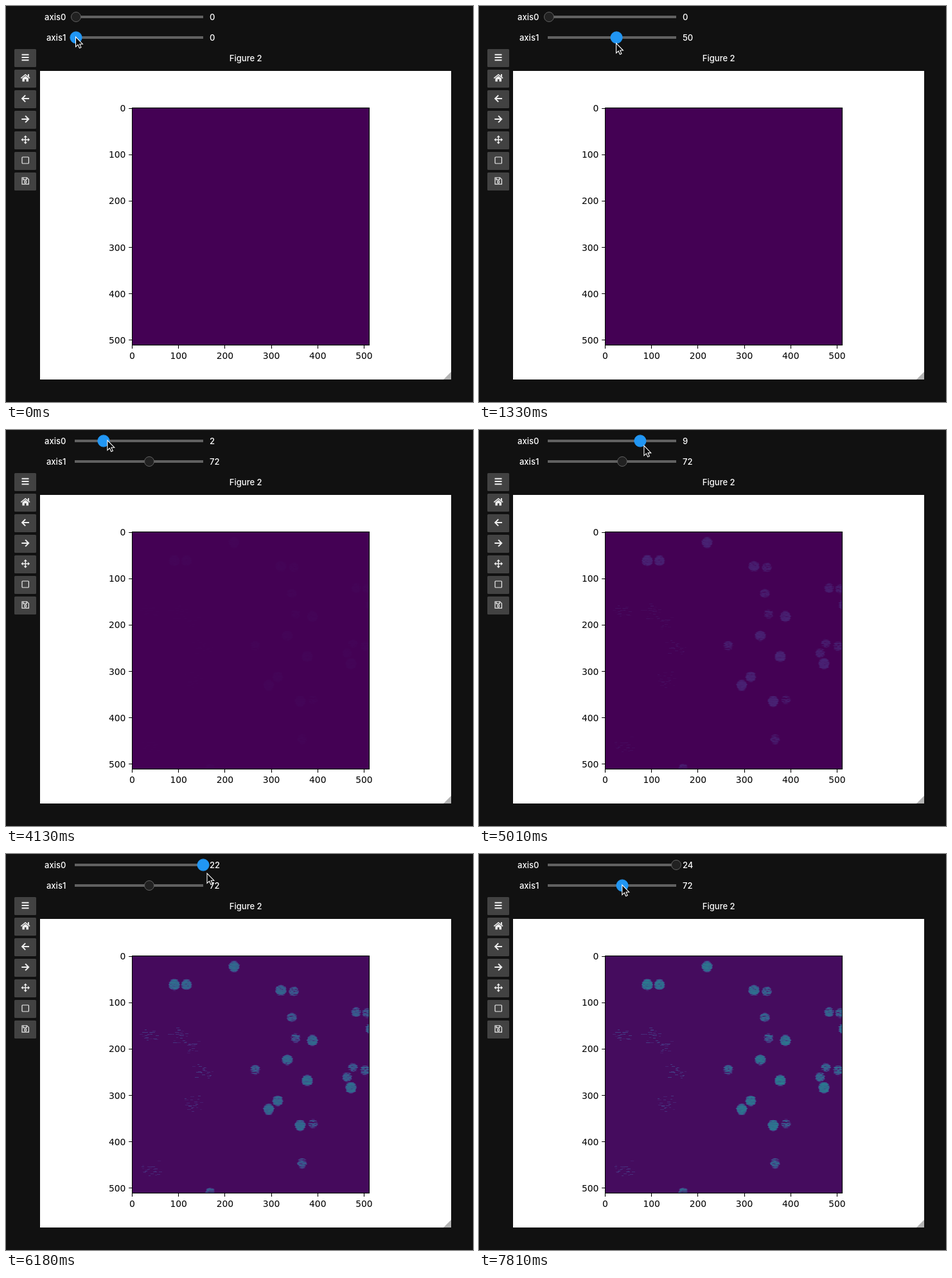
An HTML page with a canvas for the animation above (8 s loop, 727 by 616 pixels).

```html
<!DOCTYPE html>
<html lang="en">
<head>
<meta charset="utf-8">
<title>Figure 2</title>
<style>
html, body { margin: 0; width: 100%; height: 100%; overflow: hidden; background: #111; }
canvas { position: absolute; left: 53px; top: 101px; }
svg { position: absolute; left: 0; top: 0; }
.ui { font: 500 13px Inter, Roboto, sans-serif; fill: #fff; }
.tick { font: 13.89px "DejaVu Sans", sans-serif; fill: #000; stroke: none; }
.icon { fill: none; stroke: #eee; stroke-width: 2; }
.icon .solid { fill: #eee; stroke: none; }
.end { text-anchor: end; }
.mid { text-anchor: middle; }
.handle { fill: #212121; stroke: #616161; }
.handle.on { fill: #2196f3; stroke: #2196f3; }
</style>
</head>
<body>
<canvas id="fig" width="640" height="480"></canvas>
<svg width="727" height="616" viewBox="0 0 727 616">
  <g fill="#616161">
    <rect x="107" y="15" width="200" height="4"/>
    <rect x="107" y="47" width="200" height="4"/>
  </g>
  <g class="ui">
    <text class="end" x="93.3" y="21.8">axis0</text>
    <text class="end" x="93.3" y="53.8">axis1</text>
    <text id="val0" x="317" y="21.8">0</text>
    <text id="val1" x="317" y="53.8">0</text>
    <text class="mid" x="373.2" y="86">Figure 2</text>
  </g>
  <g id="buttons" fill="#424242"></g>
  <g class="icon" transform="translate(0 -.5)">
    <path d="M24.5 76.3h11M24.5 80.5h11M24.5 84.7h11"/>
    <path d="M23.3 112.9L30.2 107.2L37.1 112.9" stroke-width="1.6"/>
    <path class="solid" d="M34 106.6h1.9v4.6l-1.9-1.6zM25.4 113.1L30.2 109.2L35 113.1V118h-3.5v-3.6h-2.6V118h-3.5z"/>
    <path d="M36 144.5H25.5M30.2 139.4L25.1 144.5L30.2 149.6"/>
    <path d="M24.3 176.5H34.8M30.1 171.4L35.2 176.5L30.1 181.6"/>
    <path d="M25 208.5H35.6M30.3 203.2V213.8" stroke-width="1.5"/>
    <path class="solid" d="M30.3 201.7l2.7 3h-5.4zM30.3 215.3l2.7-3h-5.4zM23.5 208.5l3-2.7v5.4zM37.1 208.5l-3-2.7v5.4z"/>
    <rect x="25" y="235.5" width="10.4" height="10" rx="1" stroke-width="1.2"/>
    <path d="M25 267.5h7.7l2.7 2.7v7.4H25zM27 267.5v3.4h5v-3.4" stroke-width="1.2"/>
    <circle cx="30.2" cy="274.2" r="1.6" stroke-width="1.2"/>
  </g>
  <g id="axes" stroke="#000" stroke-width="1.1">
    <rect x="196.5" y="158.5" width="369" height="369" fill="none"/>
  </g>
  <path d="M693 569V581H681z" fill="#b4b4b4"/>
  <circle id="knob0" class="handle" cy="17"/>
  <circle id="knob1" class="handle" cy="49"/>
  <path id="cursor" d="M0 0V15.4L3.5 12.2L5.9 17.5L8.4 16.4L6.1 11.2H10.8z" fill="#000" stroke="#fff" stroke-width="1.1"/>
</svg>
<script>
const LOOP = 8000, STEP = 147.3, LEFT = 196, TOP = 158, SIZE = 370;
const $ = id => document.getElementById(id);
const clamp = v => Math.min(1, Math.max(0, v));
const mix = (a, b, t) => a + (b - a) * t;
const ramp = (k, from, to) => clamp((k - from) / (to - from));

function add(parent, tag, attrs, text = "") {
  const el = document.createElementNS("http://www.w3.org/2000/svg", tag);
  for (const key in attrs) el.setAttribute(key, attrs[key]);
  el.textContent = text;
  $(parent).append(el);
}

for (let i = 0; i < 7; i++)
  add("buttons", "rect", { x: 13, y: 67 + 32 * i, width: 34, height: 28, rx: 1.5 });

for (let n = 0; n <= 500; n += 100) {
  const d = n * 0.7219, x = 196.5 + d, y = 159 + d;
  add("axes", "path", { d: `M${Math.floor(x) + .5} 528v4.9M196 ${Math.floor(y) + .5}h-4.9` });
  add("axes", "text", { class: "tick mid", x, y: 549 }, n);
  add("axes", "text", { class: "tick end", x: 186.4, y: Math.round(y + 5) }, n);
}

// Cell centres on the stage
const solid = [
  [262, 203], [281, 203], [355, 175], [428, 212], [477, 290], [438, 320],
  [469, 352], [423, 384], [409, 397], [458, 422], [537, 364], [568, 272]
];
const patchy = [
  [448, 214], [445, 254], [451, 286], [388, 336], [478, 420], [461, 481],
  [545, 246], [540, 332], [531, 347], [559, 337], [562, 247], [318, 526]
];
const debris = [[221, 279], [266, 280], [287, 298], [306, 338], [288, 386], [224, 490]];

function hash(x, y) {
  let h = Math.imul(x, 374761393) + Math.imul(y, 668265263);
  h = Math.imul(h ^ (h >>> 13), 1274126177);
  return ((h ^ (h >>> 16)) >>> 0) / 4294967296;
}

// Noise drawn out along each row
function streak(x, y) {
  const i = Math.floor(x / 3), f = x / 3 - i;
  return mix(mix(hash(i, y), hash(i + 1, y), f), hash(y, 5), .35);
}

const mask = new Float32Array(SIZE * SIZE);

function plot(x, y, v) {
  if (x < 0 || y < 0 || x >= SIZE || y >= SIZE) return;
  const i = y * SIZE + x;
  mask[i] = Math.max(mask[i], v);
}

function cell(cx, cy, strength) {
  const r = 5.3 + 3 * strength;
  cx -= LEFT; cy -= TOP;
  for (let y = Math.floor(cy - r - 2); y <= cy + r + 2; y++) {
    for (let x = Math.floor(cx - r - 2); x <= cx + r + 2; x++) {
      const edge = r + (hash(y, 77) - .5) * 1.8 - Math.hypot(x + .5 - cx, y + .5 - cy);
      const n = streak(x, y);
      const fill = clamp((n - (1 - strength) * .65) * 3 + .4) * (.65 + .4 * n);
      plot(x, y, clamp(edge * .5 + .5) * fill * mix(.5, 1, strength));
    }
  }
}

// Short dim dashes scattered around a point
function scatter(cx, cy, seed) {
  for (let i = 0; i < 22; i++) {
    const rnd = n => hash(i + 31 * n, seed + 9);
    const x = Math.round(cx - LEFT + (rnd(1) + rnd(2) - 1) * 16);
    const y = Math.round(cy - TOP + (rnd(3) + rnd(4) - 1) * 15);
    for (let j = 0; j < 2 + rnd(5) * 4; j++) plot(x + j, y, .1 + .3 * rnd(6));
  }
}

solid.forEach(([x, y]) => cell(x, y, .8 + .2 * hash(x, y)));
patchy.forEach(([x, y]) => cell(x, y, .5 + .15 * hash(x, y)));
debris.forEach(([x, y], i) => scatter(x, y, i));

// Lower half of viridis
const stops = [[68, 1, 84], [72, 36, 117], [65, 68, 135], [53, 95, 141], [42, 120, 142], [33, 145, 140]];
const ctx = $("fig").getContext("2d");
ctx.fillStyle = "#fff";
ctx.fillRect(0, 0, 640, 480);
const image = ctx.createImageData(SIZE, SIZE);
let shown = -1;

function paint(value) {
  if (value === shown) return;
  shown = value;
  const gain = .43 * Math.pow(value / 24, 1.45);
  const base = .03 * ramp(value, 12, 24);
  for (let i = 0; i < mask.length; i++) {
    const p = Math.min(4.99, mix(base, Math.max(base, gain), mask[i]) * 10);
    const a = Math.floor(p);
    for (let c = 0; c < 3; c++)
      image.data[i * 4 + c] = mix(stops[a][c], stops[a + 1][c], p - a);
    image.data[i * 4 + 3] = 255;
  }
  ctx.putImageData(image, 143, 57);
}

function knob(id, x, on, big) {
  const el = $(id);
  el.setAttribute("cx", x);
  el.setAttribute("r", big ? 9.1 : 7.5);
  el.classList.toggle("on", on);
}

function draw(time) {
  const k = Math.min(53, Math.floor((time % LOOP + 6) / STEP));

  // Knobs follow the drag at a steady pace, the readouts lag behind
  const x0 = Math.min(307, 109 + 16.5 * Math.max(0, k - 25.4));
  const x1 = Math.min(223, 109 + 13 * Math.max(0, k - .92));
  const value0 = Math.round(24 * Math.pow(ramp(k, 24, 43), 1.5));
  const value1 = Math.round(72 * (1 - Math.pow(1 - ramp(k, 1, 18), 1.85)));
  $("val0").textContent = value0;
  $("val1").textContent = value1;
  knob("knob0", x0, k >= 24 && k < 53, k >= 24 && k < 46);
  knob("knob1", x1, k < 25 || k >= 52, k < 18 || k >= 52);

  // The pointer drags one knob, then the other, then returns
  const up = ramp(k, 20, 25), back = ramp(k, 45, 52);
  const px = mix(mix(x1 - .5, x0 + 6, up), 222.8, back);
  const py = mix(mix(48 + 12 * ramp(k, 0, 11), 16 + 14 * ramp(k, 28, 38), up), 48, back);
  $("cursor").setAttribute("transform", `translate(${px} ${py})`);
  paint(value0);
}

const start = performance.now();
function loop() {
  draw(performance.now() - start);
  requestAnimationFrame(loop);
}
loop();
</script>
</body>
</html>
```
